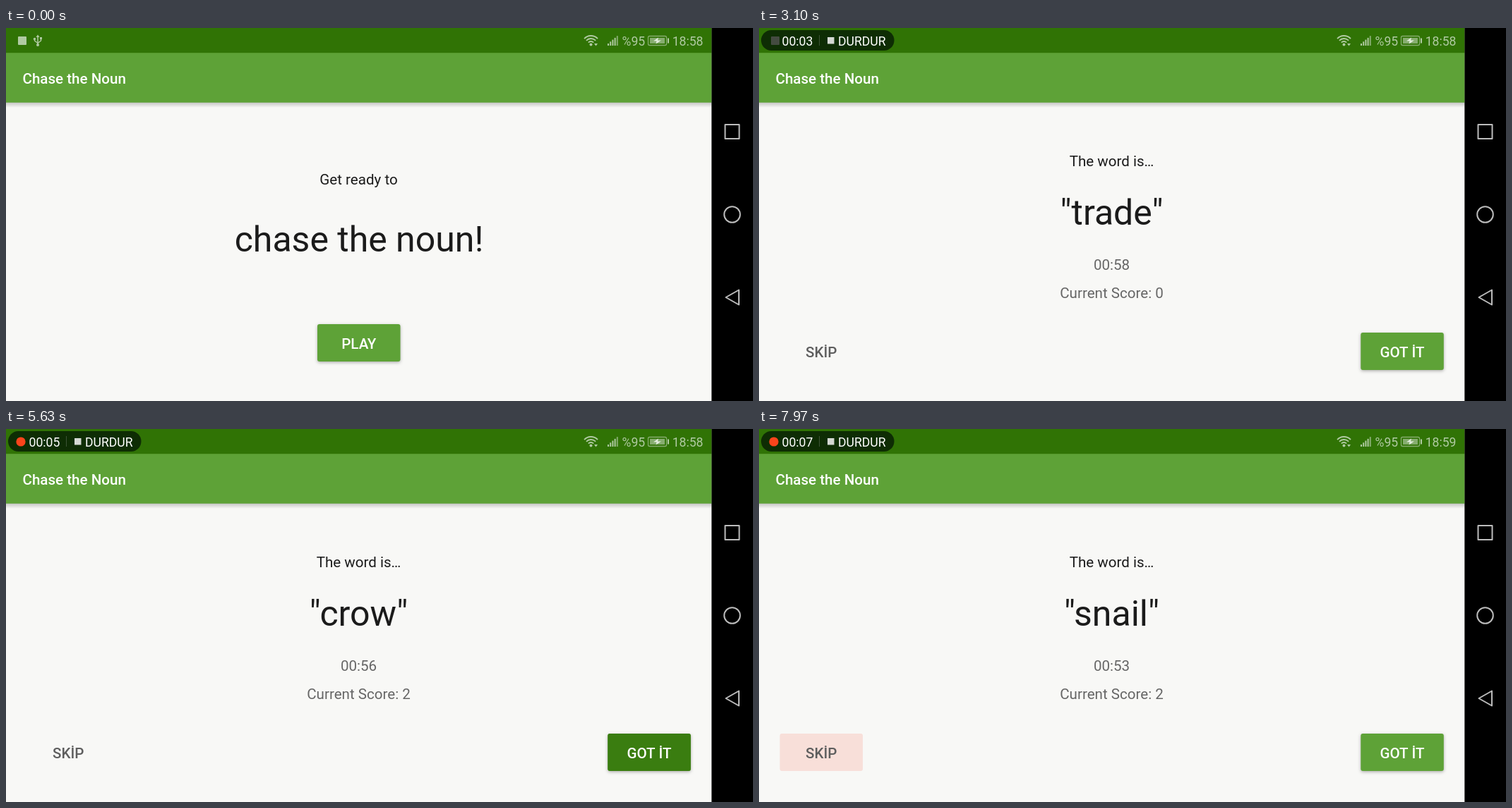
An HTML page with a canvas for the animation above (8000 ms loop, 1058 by 529 pixels).

```html
<!DOCTYPE html>
<html lang="en">
<head>
<meta charset="utf-8">
<title>Word game</title>
<style>
html, body { margin: 0; width: 100%; height: 100%; overflow: hidden; background: #000; }
canvas { display: block; width: 1058px; height: 529px; }
</style>
</head>
<body>
<canvas id="stage" width="1058" height="529"></canvas>
<script>
const g = document.getElementById('stage').getContext('2d');
const LOOP = 8000, W = 999.5;
const GREEN = '#5ea237', DARK = '#307305', INK = '#1b1b1b', GREY = '#666', ICON = '#b0caa2', DIM = '#86ad6f';
const BODY = 20.57, BIG = 50, SMALL = 17.6;

// Slide between the two screens
const SLIDE = { start: 1592, length: 671 };

// Button presses: ripple start, spot position, time the ripple stays full
const PLAY = [{ at: 1410, x: 500, y: 446, hold: 2000 }];
const GOT = [4080, 5330, 6370].map(at => ({ at, x: 908, y: 449, hold: 300 }));
const SKIP = [{ at: 7640, x: 90, y: 456, hold: 500 }];

// Start time, word, score
const ROUNDS = [[0, 'trade', 0], [4080, 'jelly', 1], [5330, 'crow', 2], [6370, 'roll', 3], [7640, 'snail', 2]];

const clamp = v => Math.max(0, Math.min(1, v));
const clock = s => '00:' + String(s).padStart(2, '0');

function rect(x, y, w, h, color, r = 0) {
  g.fillStyle = color;
  g.beginPath();
  g.roundRect(x, y, w, h, r);
  g.fill();
}

function disc(x, y, r, color) {
  g.fillStyle = color;
  g.beginPath();
  g.arc(x, y, r, 0, 7);
  g.fill();
}

function line(points, color, width, close) {
  g.strokeStyle = color;
  g.lineWidth = width;
  g.lineJoin = 'round';
  g.beginPath();
  points.forEach(([x, y]) => g.lineTo(x, y));
  if (close) g.closePath();
  g.stroke();
}

function shape(points, color) {
  g.fillStyle = color;
  g.beginPath();
  points.forEach(([x, y]) => g.lineTo(x, y));
  g.fill();
}

function text(s, x, y, size, color, align = 'center', weight = 400) {
  g.font = `${weight} ${size}px Roboto, sans-serif`;
  g.textAlign = align;
  g.fillStyle = color;
  g.fillText(s, x, y);
}

function button(x, y, label, t, presses, flat) {
  const w = 117.5, h = 53;
  if (!flat) {
    g.save();
    g.shadowColor = 'rgba(0,0,0,.3)';
    g.shadowBlur = 4;
    g.shadowOffsetY = 1.5;
    rect(x, y, w, h, GREEN, 3);
    g.restore();
  }
  g.save();
  g.beginPath();
  g.roundRect(x, y, w, h, 3);
  g.clip();
  for (const p of presses) {
    const age = t - p.at;
    if (age < 0) continue;
    g.globalAlpha = clamp(age / 75) * clamp(1 - (age - p.hold) / 250) * (flat ? 1 : .7);
    disc(p.x, p.y, 19 + age * .25, flat ? '#f8dfd9' : DARK);
    if (!flat) {
      g.globalAlpha *= .3;
      rect(x, y, w, h, DARK);
    }
  }
  g.restore();
  text(label, x + w / 2, y + 34.5, BODY, flat ? '#5e5e5e' : '#fff', 'center', 500);
}

// Touch markers, fading out on release
function spots(t) {
  for (const p of [...PLAY, ...GOT, ...SKIP]) {
    const age = t - p.at;
    if (age < -110 || age > 200) continue;
    const fade = clamp(age / 200);
    g.globalAlpha = 1 - fade;
    disc(p.x, p.y, 15.5 + fade * 4, 'rgba(255,255,255,.42)');
    g.strokeStyle = 'rgba(120,120,120,.25)';
    g.lineWidth = 1;
    g.stroke();
    g.globalAlpha = 1;
  }
}

function titleScreen(t) {
  text('Get ready to', 499.5, 222, BODY, INK);
  text('chase the noun!', 500, 316.5, BIG, INK);
  button(441, 420, 'PLAY', t, PLAY);
}

function gameScreen(t) {
  const [, word, score] = ROUNDS.findLast(r => t >= r[0]);
  const left = 59 - Math.max(0, Math.floor((t - 1630) / 1005));
  text('The word is…', 499.5, 196, BODY, INK);
  text(`"${word}"`, 499.5, 278.5, BIG, INK);
  text(clock(left), 499.5, 342.5, BODY, GREY);
  text('Current Score: ' + score, 499.5, 382.5, BODY, GREY);
  button(29.5, 432, 'SKİP', t, SKIP, true);
  button(852.3, 432, 'GOT İT', t, GOT);
}

function statusIcons(t) {
  // Wi-Fi
  g.strokeStyle = ICON;
  g.lineWidth = 1.8;
  for (const r of [5, 9, 13]) {
    g.beginPath();
    g.arc(828.5, 24, r, -Math.PI * .76, -Math.PI * .24);
    g.stroke();
  }
  disc(828.5, 23.5, 2, ICON);
  shape([[833, 22], [838, 22], [835.5, 25.5]], ICON);
  // Signal
  for (let i = 0; i < 5; i++) rect(852 + i * 3.2, 22 - i * 2.7, 2, 3 + i * 2.7, i < 4 ? ICON : DIM);
  text('%95', 872.5, 24.5, SMALL, ICON, 'left');
  // Battery
  g.strokeStyle = DIM;
  g.lineWidth = 1.3;
  g.beginPath();
  g.roundRect(909.5, 11.5, 26, 13, 2);
  g.stroke();
  rect(912, 14, 21, 8, DIM);
  rect(937, 14.5, 2, 7, ICON);
  shape([[924, 13.5], [917, 18.5], [921.5, 18.5], [920.5, 22.5], [928, 17.5], [923, 17.5]], '#e4eddf');
  text(t < 7500 ? '18:58' : '18:59', 987.5, 24.5, SMALL, ICON, 'right');
}

function usbIcons() {
  rect(17, 12, 12, 12, ICON, 1);
  line([[45, 12], [45, 24]], ICON, 1.5);
  line([[40.5, 15], [40.5, 18], [45, 21.5], [49.5, 18], [49.5, 14]], ICON, 1.5);
  shape([[42.5, 13], [45, 9.5], [47.5, 13]], ICON);
  disc(45, 24, 2, ICON);
  disc(40.5, 15.5, 1.7, ICON);
  rect(48, 13, 3, 3, ICON);
}

function recorder(t) {
  const second = Math.max(0, Math.floor((t - 79) / 998));
  const phase = (t - 104 + 998) % 998;
  rect(3, 3, 188.5, 29, '#0e2d04', 14.5);
  if (phase > 485 && t > 300) disc(21, 18, 6.6, '#fb441b');
  else rect(17, 12, 12, 12, '#444b41', 1);
  text(clock(second), 32.5, 24.5, SMALL, '#fff', 'left');
  rect(85, 10, 1, 15, '#3d5336');
  rect(97, 13, 9.5, 9.5, '#d5d9d3');
  text('DURDUR', 112, 24.5, SMALL, '#fff', 'left');
}

function navBar() {
  const c = '#bcbcbc';
  rect(W, 0, 1058 - W, 529, '#000');
  line([[1018.5, 137], [1038.5, 137], [1038.5, 157], [1018.5, 157]], c, 2, true);
  g.beginPath();
  g.arc(1028.5, 264.5, 11.3, 0, 7);
  g.stroke();
  line([[1019.5, 382], [1038, 371.5], [1038, 392.5]], c, 2, true);
}

function draw(t) {
  rect(0, 0, W, 529, '#f8f8f6');
  const k = clamp((t - SLIDE.start) / SLIDE.length);
  const shift = W * (1 - Math.cos(Math.PI * k)) / 2;
  g.save();
  g.translate(-shift, 0);
  if (k < 1) titleScreen(t);
  g.translate(W, 0);
  if (k > 0) gameScreen(t);
  g.restore();

  const shade = g.createLinearGradient(0, 105, 0, 113);
  shade.addColorStop(0, 'rgba(0,0,0,.22)');
  shade.addColorStop(1, 'rgba(0,0,0,0)');
  rect(0, 105, W, 8, shade);
  rect(0, 35, W, 70.7, GREEN);
  rect(0, 0, W, 35.3, DARK);
  text('Chase the Noun', 23.5, 79, BODY, '#fff', 'left', 500);

  statusIcons(t);
  const shown = clamp((t - 30) / 200);
  g.globalAlpha = 1 - shown;
  usbIcons();
  g.globalAlpha = shown;
  recorder(t);
  g.globalAlpha = 1;
  navBar();
  spots(t);
}

let origin;
function tick(now) {
  origin ??= now;
  draw((now - origin) % LOOP);
  requestAnimationFrame(tick);
}
draw(0);
requestAnimationFrame(tick);
</script>
</body>
</html>
```
